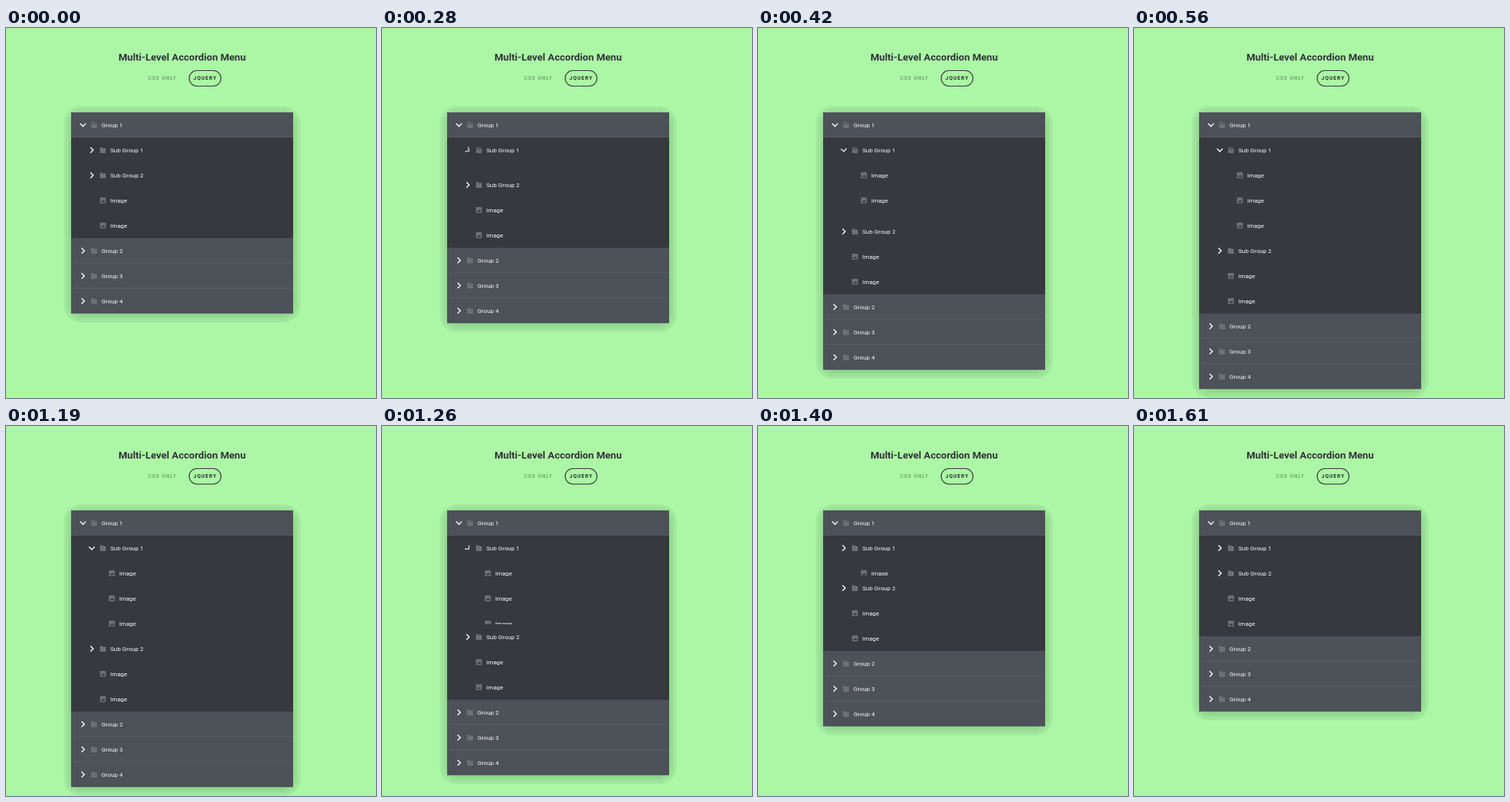
These frames come from a looping animation (500x500 px, 2.31 s). An HTML page with a canvas:

```html
<!DOCTYPE html>
<html lang="en">
<head>
<meta charset="utf-8">
<title>Multi-Level Accordion Menu</title>
<style>
  html, body { margin: 0; width: 100%; height: 100%; overflow: hidden; background: #acf7a5; }
  canvas { display: block; width: 500px; height: 500px; }
</style>
</head>
<body>
<canvas id="stage"></canvas>
<script>
const canvas = document.getElementById('stage');
const ctx = canvas.getContext('2d');
const ratio = window.devicePixelRatio || 1;
canvas.width = canvas.height = 500 * ratio;

const LOOP = 2310, TICK = 70;
const ROW = 34, LEFT = 88, TOP = 114, WIDTH = 300;
const OPEN = { from: 204.5, dur: 325, shown: 280 };
const CLOSE = { from: 1178, dur: 312, shown: 1190 };
const BG = [172, 247, 165], SHADE = [112, 172, 118];
const DARK = '#36393e', BAR = '#4d5158', LINE = '#575b62', ICON = '#6d7076', INK = '#2f3337';

const clamp = v => Math.min(1, Math.max(0, v));
const swing = p => 0.5 - Math.cos(p * Math.PI) / 2;

// CSS "ease": cubic-bezier(.25, .1, .25, 1), solved by bisection
function ease(p) {
  const bez = (a, b, s) => 3 * a * s * (1 - s) ** 2 + 3 * b * s * s * (1 - s) + s ** 3;
  let lo = 0, hi = 1;
  for (let i = 0; i < 24; i++) {
    const mid = (lo + hi) / 2;
    if (bez(0.25, 0.25, mid) < p) lo = mid; else hi = mid;
  }
  return bez(0.1, 1, lo);
}

function stateAt(t) {
  if (t < OPEN.shown) return { open: false, height: 0, turn: 0 };
  const open = t < CLOSE.shown;
  const span = open ? OPEN : CLOSE;
  const p = clamp((t - span.from) / span.dur);
  const at = f => open ? f(p) : 1 - f(p);
  return { open, height: Math.round(3 * ROW * at(swing)), turn: at(ease) };
}

function rect(x, y, w, h, color) {
  ctx.fillStyle = color;
  ctx.fillRect(x, y, w, h);
}

function shape(x, y, points, color) {
  ctx.fillStyle = color;
  ctx.beginPath();
  for (let i = 0; i < points.length; i += 2) ctx.lineTo(x + points[i], y + points[i + 1]);
  ctx.fill();
}

function text(str, x, y, font, color, spacing = 0, align = 'left') {
  ctx.font = font + ' Roboto, "Open Sans", sans-serif';
  ctx.letterSpacing = spacing + 'px';
  ctx.textAlign = align;
  ctx.fillStyle = color;
  ctx.fillText(str, x, y);
}

// turn: 0 points right, 1 points down
function chevron(x, y, turn) {
  ctx.save();
  ctx.translate(x, y);
  ctx.rotate((turn - 1) * Math.PI / 2);
  ctx.globalAlpha = 1 - 0.25 * Math.sin(turn * Math.PI);
  ctx.strokeStyle = '#fff';
  ctx.lineWidth = 1.4;
  ctx.beginPath();
  ctx.moveTo(-3.8, -1.9);
  ctx.lineTo(0, 1.9);
  ctx.lineTo(3.8, -1.9);
  ctx.stroke();
  ctx.restore();
}

function folder(x, y, open) {
  if (open) {
    shape(x, y, [-3.7, -3.8, -0.9, -3.8, 0.1, -2.8, 3.7, -2.8, 3.7, -1.5, -3.7, -1.5], ICON);
    shape(x, y, [-4.3, -0.8, 4.5, -0.8, 3.6, 3.9, -3.5, 3.9], ICON);
  } else {
    shape(x, y, [-4, -3.8, -0.9, -3.8, 0.2, -2.6, 4, -2.6, 4, 3.9, -4, 3.9], ICON);
  }
}

function group(label, x, y, open, turn) {
  chevron(x, y, turn);
  folder(x + 15, y, open);
  text(label, x + 25, y + 3, '8px', '#fff', 0.11);
}

function image(x, y) {
  ctx.fillStyle = ICON;
  ctx.beginPath();
  ctx.roundRect(x - 4, y - 4, 8, 8, 0.8);
  ctx.fill();
  shape(x, y, [-2.9, 2.4, -1.3, 0, -0.2, 1.2, 1.2, -0.8, 2.9, 2.4], DARK);
  text('Image', x + 10, y + 3, '8px', '#fff', 0.11);
}

function bar(label, y, open) {
  rect(LEFT, y, WIDTH, ROW, BAR);
  rect(LEFT, y + ROW - 1, WIDTH, 1, LINE);
  group(label, LEFT + 16, y + 17, open, open ? 1 : 0);
}

// Soft shadow as nested contours, cut off ten pixels out
function shadow(height) {
  for (let d = 10; d >= -2; d--) {
    const mix = 1 / (1 + Math.exp(0.166 * d));
    const rgb = BG.map((c, i) => Math.round(c + (SHADE[i] - c) * mix));
    ctx.fillStyle = `rgb(${rgb})`;
    ctx.beginPath();
    ctx.roundRect(LEFT - d, TOP + 2 - d, WIDTH + 2 * d, height + 2 * d, 17 + 0.6 * d);
    ctx.fill();
  }
}

function heading() {
  text('Multi-Level Accordion Menu', 238, 44, 'bold 13.55px', INK, 0, 'center');
  text('CSS ONLY', 192, 70, 'bold 7px', '#72a871', 0.8);
  text('JQUERY', 253.3, 70, 'bold 7px', INK, 0.95);
  ctx.strokeStyle = INK;
  ctx.lineWidth = 1.1;
  ctx.beginPath();
  ctx.roundRect(247.5, 57.5, 43, 21, 10.5);
  ctx.stroke();
}

function draw(t) {
  const { open, height, turn } = stateAt(t);
  ctx.setTransform(ratio, 0, 0, ratio, 0, 0);
  rect(0, 0, 500, 500, `rgb(${BG})`);
  heading();

  const total = 8 * ROW + height;
  shadow(total);
  rect(LEFT, TOP, WIDTH, total, DARK);
  bar('Group 1', TOP, true);

  const subX = LEFT + 28;
  const subY = TOP + 1.5 * ROW;
  group('Sub Group 1', subX, subY, open, turn);

  ctx.save();
  ctx.beginPath();
  ctx.rect(LEFT, TOP + 2 * ROW, WIDTH, height);
  ctx.clip();
  for (let i = 1; i <= 3; i++) image(subX + 27, subY + i * ROW);
  ctx.restore();

  const below = subY + height;
  group('Sub Group 2', subX, below + ROW, false, 0);
  image(subX + 15, below + 2 * ROW);
  image(subX + 15, below + 3 * ROW);
  for (let i = 2; i <= 4; i++) bar('Group ' + i, TOP + height + (i + 3) * ROW, false);
}

const start = performance.now();
function frame() {
  const t = (performance.now() - start) % LOOP;
  draw(Math.floor(t / TICK) * TICK);
  requestAnimationFrame(frame);
}
frame();
</script>
</body>
</html>
```
